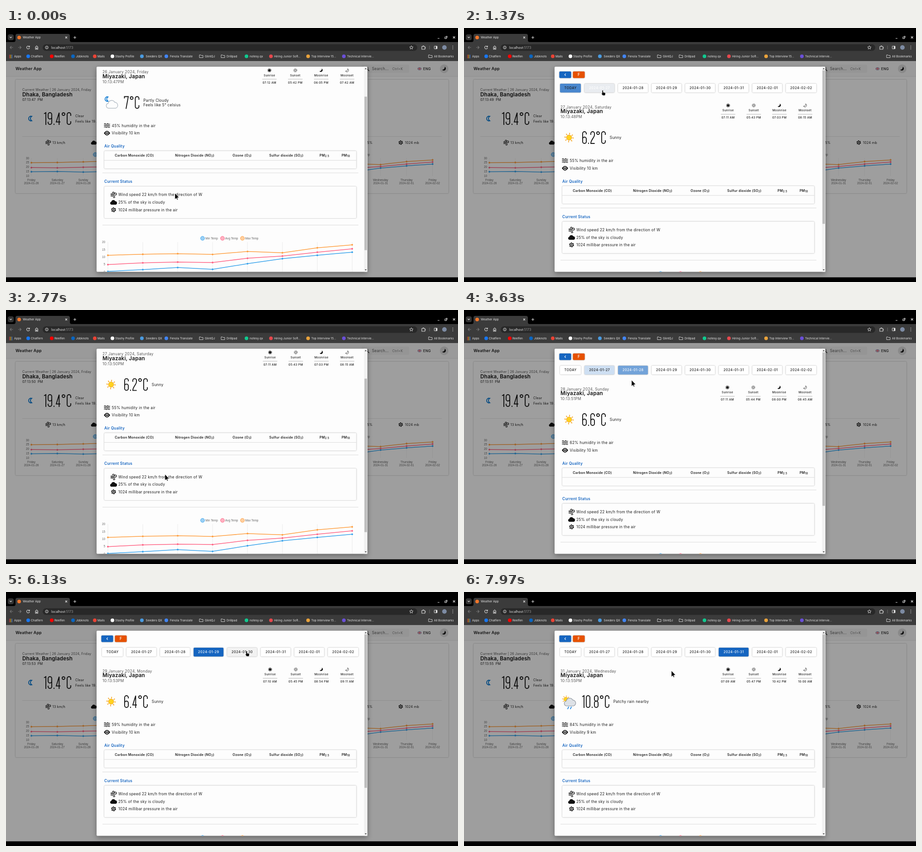
These frames come from a looping animation (998 by 561 pixels, 8 s). An HTML page:

```html
<!DOCTYPE html>
<html lang="en">
<head>
<meta charset="utf-8">
<title>Weather App</title>
<style>
html, body { margin: 0; width: 100%; height: 100%; overflow: hidden; background: #000; }
svg { display: block; width: 100%; height: 100%; }
text { font: 400 8.32px Inter, sans-serif; letter-spacing: .26px; fill: #1c1c1c; white-space: pre; }
.s { font-size: 7.28px; letter-spacing: .24px; }
.xs { font-size: 6.24px; letter-spacing: .38px; font-weight: 500; }
.h { font-size: 11.65px; font-weight: 600; letter-spacing: .18px; fill: #111; }
.th { font-size: 7.28px; font-weight: 600; letter-spacing: .28px; }
.blue { font-weight: 600; fill: #1565c0; }
.dim { fill: #555; }
.btn { font-size: 7.28px; font-weight: 500; letter-spacing: .5px; }
.chart { font: 6.4px "Liberation Sans", sans-serif; letter-spacing: 0; fill: #666; }
.ui { font-size: 6.45px; letter-spacing: 0; fill: #e6e6e6; }
.url { font-size: 7.1px; letter-spacing: .05px; fill: #eee; }
.mid { text-anchor: middle; }
.end { text-anchor: end; }
.raised { filter: drop-shadow(0 .8px .8px rgba(0, 0, 0, .38)); }
.line { fill: none; stroke: #111; stroke-width: 1.3; stroke-linecap: round; }
.pale { fill: none; stroke: #ddd; stroke-width: 1.1; }
</style>
</head>
<body>
<svg id="stage" viewBox="0 0 998 561"></svg>
<script>
const LOOP = 8000;
const BLUE = [21, 101, 192], WHITE = [255, 255, 255], HOVER = [242, 242, 242];
const SERIES = [['Min Temp', '#36a2eb', '#9bd0f5'], ['Avg Temp', '#ff6384', '#ffb1c1'], ['Max Temp', '#ff9f40', '#ffcf9f']];
const WEEK = ['Friday', 'Saturday', 'Sunday', 'Monday', 'Tuesday', 'Wednesday', 'Thursday'];
const DATES = ['2024-01-26', '2024-01-27', '2024-01-28', '2024-01-29', '2024-01-30', '2024-01-31', '2024-02-01', '2024-02-02'];

const text = (x, y, s, cls = '', extra = '') => `<text x="${x}" y="${y}" class="${cls}" ${extra}>${s}</text>`;
const rect = (x, y, w, h, fill, r = 0, extra = '') => `<rect x="${x}" y="${y}" width="${w}" height="${h}" rx="${r}" fill="${fill}" ${extra}/>`;
const dot = (x, y, r, fill, extra = '') => `<circle cx="${x}" cy="${y}" r="${r}" fill="${fill}" ${extra}/>`;
const path = (d, extra = 'class="line"') => `<path d="${d}" ${extra}/>`;
const at = (x, y, body, scale = 1) => `<g transform="translate(${x} ${y}) scale(${scale})">${body}</g>`;
const rule = (x1, x2, y, color = '#ccc') => path(`M${x1} ${y}H${x2}`, `stroke="${color}" stroke-width=".7"`);

const CLOUD = 'M-4.3 5a3.2 3.2 0 0 1-.4-6.3a4.4 4.4 0 0 1 8.2-1.2a3.8 3.8 0 0 1 .8 7.5z';
const CRESCENT = 'M3-5A5.3 5.3 0 1 0 3 5A5.6 5.6 0 0 1 3-5z';
const ring = (r, w, dash, color = '#111') => dot(0, 0, r, 'none', `stroke="${color}" stroke-width="${w}" stroke-dasharray="${dash}"`);
const icon = {
  wind: path('M-6-2H-.5a2 2 0 1 0-2-2M-6 .4H4a2.3 2.3 0 1 0-2.3-2.4M-6 2.8H1a1.8 1.8 0 1 1-1.8 2'),
  cloud: path(CLOUD, 'fill="#111"'),
  gear: ring(4.3, 2, '2.5 2') + ring(3.3, 1.2, 'none') + dot(0, 0, 1.5, '#111'),
  waves: [-3.4, 0, 3.4].map(y => path(`M-6 ${y}q1.5-1.7 3 0t3 0t3 0t3 0`)).join(''),
  eye: path('M-6.8 0Q0-10 6.8 0Q0 10-6.8 0z', 'fill="#111"') + dot(0, 0, 3.1, '#fff') + dot(0, 0, 1.9, '#111'),
  sunrise: dot(0, 0, 2.6, '#111') + ring(3.6, 1.3, '1.5 1.3'),
  sunset: dot(0, 0, 1.9, 'none', 'stroke="#111" stroke-width=".8"') + ring(3.6, 1, '1.5 1.3'),
  moonrise: path('M1-4A4 4 0 1 1-4 2A5 5 0 0 0 1-4z', 'fill="#111"'),
  moonset: path('M1-3.6A3.7 3.7 0 1 1-3.7 1.5Q2 2 1-3.6z', 'fill="none" stroke="#111" stroke-width=".7"'),
  moon: path(CRESCENT, 'fill="none" stroke="#0a78d1" stroke-width="1.8"'),
  sun: ring(8.6, 3.6, '1.7 5.05', '#f5a524') + dot(0, 0, 5.8, '#ffd21e', 'stroke="#f2a01e" stroke-width="1"'),
  folder: path('M-4-3h3l1 1.2h4v4.8h-8z', 'class="pale" style="stroke-width:.9"')
};
icon.cloudMoon = at(-9.5, -7.5, icon.moon, .95) +
  at(2, 4, path(CLOUD, 'fill="#fdfdfd" stroke="#b9c1c9" stroke-width=".9"'), 1.75);
icon.rain = at(-7, -5, icon.sun, .8) +
  at(2, 1, path(CLOUD, 'fill="#dde1e6" stroke="#8f969e" stroke-width=".7"'), 1.75) +
  path('M-1 12l-2 4M5 12l-2 4', 'stroke="#1e88e5" stroke-width="1.7" stroke-linecap="round"');

// Condensed numerals: [outline, advance]
const GLYPHS = {
  0: ['M1 5a4 4 0 0 1 8 0v18a4 4 0 0 1-8 0z', 13],
  1: ['M0 3.5L4 1V28', 8],
  2: ['M1 8V5a4 4 0 0 1 8 0v3C9 14 1 19 1 27H9.6', 13],
  4: ['M7.3 28V1L1 21.5H10', 13],
  6: ['M9 7V5a4 4 0 0 0-8 0v18a4 4 0 0 0 8 0v-6a4 4 0 0 0-8 0', 13],
  7: ['M.5 5V1H9L4 28', 12.5],
  8: ['M5 1a4 4 0 0 1 4 4v4a4 4 0 0 1-8 0V5a4 4 0 0 1 4-4zM5 13a4 4 0 0 1 4 4v6a4 4 0 0 1-8 0v-6a4 4 0 0 1 4-4z', 13],
  9: ['M1 21v2a4 4 0 0 0 8 0V5a4 4 0 0 0-8 0v6a4 4 0 0 0 8 0', 13],
  '.': ['M1 25.5v2.5', 5],
  '°': ['M1 4.2a3 3 0 0 1 6 0a3 3 0 0 1-6 0', 10.5],
  C: ['M9.5 8V5a4 4 0 0 0-8 0v18a4 4 0 0 0 8 0v-3', 11]
};
function temperature(x, y, value) {
  let body = '';
  for (const ch of value + '°C') {
    body += at(x, y, path(GLYPHS[ch][0], 'fill="none" stroke="#151515" stroke-width="1.9"'));
    x += GLYPHS[ch][1];
  }
  return { svg: `<g role="img" aria-label="${value}°C">${body}</g>`, end: x };
}

function curve(points, color) {
  const d = points.map(([x, y], i) => {
    if (!i) return `M${x} ${y}`;
    const [px, py] = points[i - 1], m = (x + px) / 2;
    return `C${m - 12} ${py + (y - py) * .34} ${m + 12} ${py + (y - py) * .66} ${x} ${y}`;
  }).join('');
  return path(d, `fill="none" stroke="${color}" stroke-width="1.5"`) +
    points.map(([x, y]) => dot(x, y, 1.9, color)).join('');
}
const dateLabel = (x, y, i) => text(x, y, WEEK[i % 7], 'chart mid') + text(x, y + 7, DATES[i], 'chart mid');

function browser() {
  const bookmarks = [
    [49, 'Chatfern', '#1877f2', 55], [101, 'Reelfen', '#f00', 107], [148, 'Jobknots', '#0a66c2', 154.5],
    [196, 'Mails', '#ea4335', 202], [235, 'Stashy Profile', '#fff', 241], [300, 'Seeders QX', '#4a9be0', 308.5],
    [354, 'Fenola Translate', '#4285f4', 362], [431, 'GlintQJ', '', 439], [479, 'Drillpad', '', 487],
    [531, 'notesy.qx', '#10c98f', 538], [585, 'Hiring Junior Soft...', '#e5484d', 592],
    [667, 'Top Interview 15...', '#e9a23b', 674], [746, 'Technical Intervie...', '#6a4fd8', 753], [937, 'All Bookmarks', '', 945]
  ];
  let s = rect(0, 0, 998, 561, '#000') + rect(0, 31, 998, 42, '#3b3b3b') +
    path('M17 31q4 0 4-4V17q0-4 4-4H137q4 0 4 4V27q0 4 4 4z', 'fill="#3b3b3b"') +
    rect(4, 14, 13, 13, '#333', 4) + path('M8.3 19.5l2.2 2.2l2.2-2.2', 'class="pale"') +
    dot(29, 21, 4, '#f0762b') + text(37, 23.4, 'Weather App', 'ui') +
    path('M131 19l4 4m0-4l-4 4M149 21h6m-3-3v6', 'class="pale"') +
    path('M953 23h4M969 20h3.5v3.5h-3.5zM971 18.3h3v3.2M987 18.5l4.5 4.5m0-4.5l-4.5 4.5', 'class="pale"') +
    path('M15.500 43H9m3-3l-3 3l3 3M27 43h6.500m-3-3l3 3l-3 3', 'class="pale" style="stroke:#777"') +
    path('M51.500 41A3.300 3.300 0 1 0 52 44M52 39v2.600h-2.600M65 47V42l2.700-2.600l2.700 2.600v5h-2v-3h-1.500v3z', 'class="pale"') +
    rect(81, 36, 827, 14.5, '#282828', 7.2) +
    dot(90, 43, 3.2, 'none', 'stroke="#ddd"') + path('M90 42.500v2.200M90 41v.7', 'class="pale"') +
    text(100, 45.6, 'localhost<tspan fill="#999">:5173</tspan>', 'url') +
    path('M895 39l1.200 2.700l2.800.2l-2.200 1.900l.7 2.800l-2.500-1.500l-2.500 1.500l.7-2.800l-2.200-1.900l2.800-.2z', 'class="pale" style="stroke-width:.9"') +
    path('M918 41h2.500v-1.500h2V41h2.500v2h1v1.500h-1V47h-7z', 'class="pale"') +
    rect(934.7, 39, .8, 8, '#777') + rect(945.5, 40, 6.5, 6, 'none', .5, 'stroke="#ddd"') + rect(949, 40, 3, 6, '#ddd') +
    dot(968, 43, 5, '#7d8ba3') + [39.8, 43, 46.2].map(y => dot(986.5, y, .8, '#ddd')).join('');
  for (let i = 0; i < 9; i++)
    s += rect(7 + i % 3 * 2.7, 59.4 + (i / 3 | 0) * 2.7, 1.7, 1.7, ['#ea4335', '#fbbc04', '#4285f4'][i % 3]);
  s += text(18, 65, 'Apps', 'ui');
  for (const [x, name, color, tx] of bookmarks)
    s += (color ? dot(x, 62.5, 4, color) : at(x, 62.5, icon.folder)) + text(tx, 65, name, 'ui');
  return s;
}

function page() {
  const left = [[317.5, 317, 318.2, 317], [308.3, 308.8, 307.5, 306.5], [297.5, 297, 295.7, 294]];
  const right = [[317.5, 309.3, 304.5, 300.5], [310, 305.8, 300.5, 296], [300, 301.7, 295, 291.5]];
  let s = rect(0, 73, 998, 477.5, '#fff') +
    rect(0, 73, 998, 34, '#f8f8f8') + rule(0, 998, 107, '#ddd') +
    text(21, 93.2, 'Weather App', '', 'style="font-size:8.9px;font-weight:600;letter-spacing:.15px"') +
    rect(785, 81, 105, 18, '#f0f0f0', 3) + dot(796, 89, 3.4, 'none', 'stroke="#222"') + path('M798.500 91.500l3 3') +
    text(808, 93, 'Search...', 'dim') + text(853, 92.7, 'Ctrl+K', 's', 'style="fill:#777"') +
    rect(909, 87, 8, 6, '#1f3a84', .6) + path('M909 87l8 6m0-6l-8 6M913 87v6M909 90h8', 'stroke="#fff" stroke-width="1.5"') +
    path('M913 87v6M909 90h8', 'stroke="#d0142c" stroke-width=".9"') +
    text(921, 92.9, 'ENG', '', 'style="font-size:7.700px;font-weight:500"') +
    dot(967.5, 90, 9.5, '#ddd') + at(967.5, 90, icon.moonrise, 1.15) +
    rect(21, 114, 956, 251, '#fff', 2, 'class="raised"') +
    text(36, 139.1, 'Current Weather | 26 January 2024, Friday', 's dim', 'style="letter-spacing:.12px"') +
    text(36, 151, 'Dhaka, Bangladesh', 'h') + text(36, 161.3, '', 's', 'id="homeClock" style="letter-spacing:.1px"') +
    at(54, 200, icon.moon) + temperature(84, 186, '19.4').svg +
    text(153, 196.8, 'Clear', 's') + text(153, 208.800, 'Feels like 19.4° celsius', 's') +
    rule(36, 962, 239.5, '#ddd') + at(93, 253, icon.wind, .9) + text(102.5, 255.8, '13 km/h', 's') +
    at(194, 253, icon.cloud, .9) + text(809.5, 255.8, '45%', 's end') +
    at(871.5, 253, icon.gear, .9) + text(881, 255.8, '1024 mb', 's') +
    dot(197, 279.5, 4.4, SERIES[0][2], `stroke="${SERIES[0][1]}"`) + text(803.5, 281.5, 'Max Temp', 'chart end');
  for (let i = 0; i < 5; i++) s += text(51, 289.500 + i * 9.9, 30 - i * 5, 'chart end');
  for (let i = 0; i < 3; i++) {
    s += path(`M${56 + i * 57.3} 287v40M${827 + i * 57.4} 287v40`, 'stroke="#e2e2e2" stroke-width=".5"');
    s += dateLabel(56 + i * 57.3, 338.2, i) + dateLabel(827 + i * 57.4, 338.2, i + 5);
  }
  SERIES.forEach(([, color], k) => {
    s += curve(left[k].map((y, i) => [56 + i * 57.3, y]), color) + curve(right[k].map((y, i) => [769.7 + i * 57.4, y]), color);
  });
  return s + rect(0, 73, 998, 477.5, '#000', 0, 'opacity=".38"');
}

const buttons = ['TODAY', ...DATES.slice(1)].map((label, i) =>
  i ? { label, x: 266 + 74.1 * (i - 1), w: i === 7 ? 67.4 : 66 } : { label, x: 212, w: 46 });

function modalContent() {
  const temps = [
    [.2, 1.4, 2.8, 1.6, 5.4, 8.8, 11.1, 13.2],
    [4.8, 6, 6.5, 6.2, 9.1, 10.6, 13.2, 15.5],
    [11.1, 11.8, 12.2, 11.7, 13.7, 12.8, 16.2, 18.2]
  ];
  const chartX = i => 225 + i * 77.05, chartY = v => 550.5 + (20 - v) * 3.26;
  const heads = ['Carbon Monoxide (CO)', 'Nitrogen Dioxide (NO~2)', 'Ozone (O~3)', 'Sulfur dioxide (SO~2)', 'PM~2.5', 'PM~10'];
  let s = rect(210.5, 96, 26, 14.5, '#1565c0', 2, 'class="raised"') +
    path('M224.800 100.700l-2.500 2.500l2.500 2.500', 'fill="none" stroke="#fff" stroke-width="1.1"') +
    rect(240.5, 96, 26, 14.5, '#e65100', 2, 'class="raised"') +
    text(253.5, 106, 'F', 'mid', 'style="fill:#fff;font-weight:500;letter-spacing:0"');
  for (const b of buttons)
    s += rect(b.x, 123, b.w, 19.4, '#fff', 2, 'class="raised tab"') + text(b.x + b.w / 2 + .2, 135.400, b.label, 'btn mid');
  s += '<g id="day"></g>' + at(223, 293, icon.waves) + at(223, 309.7, icon.eye) +
    text(217, 341.800, 'Air Quality', 'blue') + text(217, 419.600, 'Current Status', 'blue') +
    rect(217, 349, 556.5, 39, '#fdfdfd', 2, 'class="raised"') + rule(217, 773.5, 369.8) +
    rule(213, 778, 397.5) + rect(217, 427.5, 556.5, 70, '#fdfdfd', 2, 'class="raised"') + rule(213, 778, 512.8);
  heads.forEach((head, i) => {
    const label = head.replace(/~([\d.]+)/, '<tspan dy="1.300" font-size="5.6">$1</tspan><tspan dy="-1.300">') + (head.includes('~') ? '</tspan>' : '');
    s += text(columns[i], 361.5, label, 'th mid');
  });
  s += at(237.5, 446, icon.wind) + text(248, 448.9, 'Wind speed 22 km/h from the direction of W') +
    at(237.5, 462.5, icon.cloud, 1.05) + text(248, 465.500, '25% of the sky is cloudy') +
    at(237.5, 479, icon.gear) + text(248, 482, '1024 millibar pressure in the air');
  SERIES.forEach(([name, color, fill], k) => {
    s += dot(434 + k * 44, 542, 4.4, fill, `stroke="${color}" stroke-width=".9"`) + text(440.2 + k * 43.9, 544.2, name, 'chart');
  });
  for (let v = 0; v <= 20; v += 5) s += text(219, chartY(v) + 2.3, v, 'chart end');
  for (let i = 0; i < 8; i++)
    s += path(`M${chartX(i)} ${chartY(20)}V${chartY(0)}`, 'stroke="#ddd" stroke-width=".6"') + dateLabel(chartX(i), 626.5, i);
  SERIES.forEach(([, color], k) => { s += curve(temps[k].map((v, i) => [chartX(i), chartY(v)]), color); });
  return s;
}

const columns = [283.3, 416.6, 521.3, 619, 703, 750.2];
// sun and moon times | icon | temperature | condition | humidity | visibility | air quality
const DAYS = [
  ['07:12 AM,05:42 PM,06:05 PM,07:42 AM', 'cloudMoon', '7', 'Partly Cloudy', 45, 10, '300.40,14.20,38.60,3.70,7.50,8.40'],
  ['07:11 AM,05:43 PM,07:03 PM,08:15 AM', 'sun', '6.2', 'Sunny', 55, 10, '328.57,7.48,64.24,5.35,22.52,27.72'],
  ['07:11 AM,05:44 PM,08:00 PM,08:45 AM', 'sun', '6.6', 'Sunny', 62, 10, '332.72,11.88,49.87,8.88,22.33,25.84'],
  ['07:10 AM,05:45 PM,08:54 PM,09:11 AM', 'sun', '6.4', 'Sunny', 59, 10, '278.10,8.41,64.83,6.29,15.68,18.21'],
  ['07:10 AM,05:46 PM,09:48 PM,09:36 AM', 'sun', '9.4', 'Sunny', 66, 10, '-,-,-,-,-,-'],
  ['07:09 AM,05:47 PM,10:42 PM,10:00 AM', 'rain', '10.8', 'Patchy rain nearby', 84, 9, '-,-,-,-,-,-']
];
function dayContent(n) {
  const [times, sky, degrees, condition, humidity, visibility, air] = DAYS[n];
  const temp = temperature(261, 228, degrees), x = temp.end + 8.3, gap = n === 0 || n === 2 ? 57.2 : 56.7;
  let s = text(213, 177.5, `${26 + n} January 2024, ${WEEK[n]}`, 'dim') + text(213, 188.3, 'Miyazaki, Japan', 'h') +
    text(213, 199.2, '', 'dim', 'id="cityClock"') + at(232, 242, icon[sky]) + temp.svg +
    text(233.5, 296, `${humidity}% humidity in the air`) + text(233.5, 312.8, `Visibility ${visibility} km`);
  s += n ? text(x, 245.200, condition) : text(x, 240.600, condition) + text(x, 250.600, 'Feels like 5° celsius');
  times.split(',').forEach((time, i) => {
    const cx = 753.2 - (3 - i) * gap, name = ['Sunrise', 'Sunset', 'Moonrise', 'Moonset'][i];
    s += at(cx, 171, icon[name.toLowerCase()]) + text(cx, 184.4, name, 'xs mid') +
      rule(cx - 16, cx + 16, 190.5, '#999') + text(cx, 200.4, time, 'xs mid');
  });
  air.split(',').forEach((value, i) => { s += text(columns[i], 382.2, value, 's mid'); });
  return s;
}

const stage = document.getElementById('stage');
stage.innerHTML = browser() + page() +
  '<clipPath id="view"><rect x="200" y="85.5" width="590" height="453"/></clipPath>' +
  rect(200, 85.5, 598, 453, '#fdfdfd', 2, 'style="filter:drop-shadow(0 4px 6px rgba(0,0,0,.35))"') +
  `<g clip-path="url(#view)"><g id="scroller">${modalContent()}</g></g>` +
  rect(790.5, 85.5, 7.5, 453, '#f1f1f1') + path('M792 91l2.200-2.800l2.200 2.800zM792 533l2.200 2.800l2.200-2.800z', 'fill="#505050"') +
  rect(791.5, 93.5, 5.500, 339, '#bdbdbd', 0, 'id="thumb"') +
  '<g id="cursor">' +
  path('M0 0V13.300L3 10.600L4.900 14.600L6.600 13.800L4.900 10L8.800 9.300z', 'id="arrow" fill="#000" stroke="#fff" stroke-width=".5"') +
  path('M-1 1.500a1.100 1.100 0 0 1 2.200 0V5l4 1q1.300.4 1 2L5.500 12H.3L-2.600 8q.6-1.400 1.600-.4z', 'id="hand" fill="#000" stroke="#fff" stroke-width=".5"') +
  '</g>';

const $ = id => document.getElementById(id);
const tabs = [...stage.querySelectorAll('.tab')], labels = [...stage.querySelectorAll('.btn')];

const CLICKS = [[1310, 1], [3503, 2], [5150, 3], [6350, 4], [7130, 5]];
const SCROLL = [[0, 77.5], [550, 0], [1800, 0], [2270, 62], [2450, 78], [2750, 78], [3150, 0]];
const POINTER = [
  [0, 373, 365], [350, 373, 365], [1050, 306, 137], [1400, 306, 137], [1750, 351, 363], [2850, 351, 363],
  [3300, 372, 137], [3520, 372, 138], [3630, 370, 155], [4200, 374, 172], [4770, 418, 163], [5050, 447, 137],
  [5350, 447, 137], [6050, 531, 130], [6450, 531, 130], [6900, 597, 134], [7200, 597, 134], [7750, 458, 174]
];

const clamp = v => Math.min(1, Math.max(0, v));
function track(keys, t) {
  const i = keys.findIndex(k => k[0] > t);
  if (i < 0) return keys[keys.length - 1].slice(1);
  const a = keys[i - 1], b = keys[i], p = (t - a[0]) / (b[0] - a[0]), e = p * p * (3 - 2 * p);
  return a.slice(1).map((v, k) => v + (b[k + 1] - v) * e);
}
// cubic-bezier(.4, 0, .2, 1) over 250 ms
function fade(ms) {
  const x = clamp(ms / 250);
  let lo = 0, hi = 1;
  for (let i = 0; i < 14; i++) {
    const u = (lo + hi) / 2, v = 1 - u;
    if (1.2 * v * v * u + .6 * v * u * u + u * u * u < x) lo = u; else hi = u;
  }
  return lo * lo * (3 - 2 * lo);
}
const mix = (a, b, p) => `rgb(${a.map((v, i) => Math.round(v + (b[i] - v) * p))})`;

let shown = -1;
function render(t) {
  const past = CLICKS.filter(c => c[0] <= t), [since, selected] = past[past.length - 1] || [-LOOP, 0];
  if (selected !== shown) $('day').innerHTML = dayContent(shown = selected);

  const [scroll] = track(SCROLL, t), [x, y] = track(POINTER, t);
  $('scroller').setAttribute('transform', `translate(0 ${-scroll})`);
  $('thumb').setAttribute('y', 93.5 + scroll * .75);

  let over = false;
  buttons.forEach((b, i) => {
    const hover = x > b.x && x < b.x + b.w && y > 123 - scroll && y < 142.4 - scroll;
    over = over || hover;
    const rest = hover ? HOVER : WHITE;
    tabs[i].style.fill = i === selected ? mix(rest, BLUE, fade(t - since - 30))
      : i === selected - 1 ? mix(BLUE, rest, fade(t - since)) : mix(rest, rest, 0);
    labels[i].style.fill = i === selected ? '#fff' : '#1c1c1c';
  });

  $('cursor').setAttribute('transform', `translate(${x} ${y})`);
  $('hand').style.display = over ? '' : 'none';
  $('arrow').style.display = over ? 'none' : '';
  $('homeClock').textContent = `07:13:${47 + Math.floor((t + 680) / 1000)}  PM`;
  $('cityClock').textContent = `10:13:${47 + Math.floor((t + 500) / 1000)}PM`;
}

const start = performance.now();
function tick() {
  render((performance.now() - start) % LOOP);
  requestAnimationFrame(tick);
}
tick();
</script>
</body>
</html>
```
